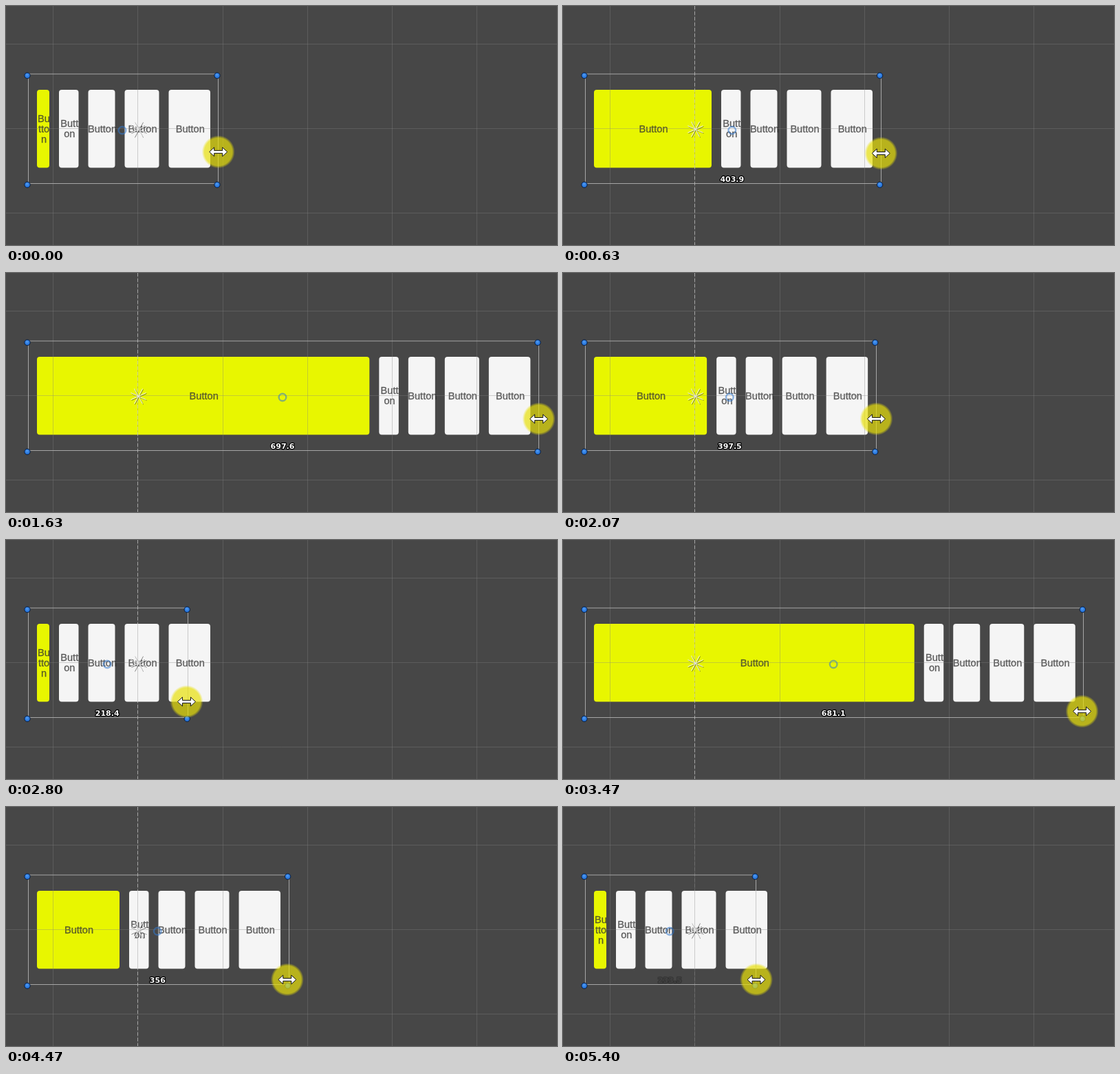
Write an HTML page with a canvas that moves like this. It is 801x348 px and loops after 5.46 s.

```html
<!DOCTYPE html>
<html lang="en">
<head>
<meta charset="utf-8">
<title>Layout resize</title>
<style>
  html, body { margin: 0; width: 100%; height: 100%; overflow: hidden; background: #474747; }
  canvas { display: block; }
</style>
</head>
<body>
<canvas id="stage" width="801" height="348"></canvas>
<script>
const ctx = document.getElementById('stage').getContext('2d');
const LOOP = 5460, WIDTH = 801, HEIGHT = 348, GAP = 14;
const START_SIZE = 259.5;

// Each drag eases the panel to a new size; a higher snap brakes earlier.
const DRAGS = [
  { from: 300, to: 1400, size: 698.7, snap: 2.8506 },
  { from: 1610, to: 2530, size: 218.4, snap: 2.6361 },
  { from: 2800, to: 3730, size: 711, snap: 3.1232 },
  { from: 3910, to: 4970, size: 233.5, snap: 3.1018 }
];

const ramp = (t, from, to) => Math.max(0, Math.min(1, (t - from) / (to - from)));
const ease = (u, snap) => 1 - (1 - u) ** snap * (1 + snap * u);

function panelSize(t) {
  let size = START_SIZE;
  for (const d of DRAGS) size += (d.size - size) * ease(ramp(t, d.from, d.to), d.snap);
  return size;
}

const pointerLag = t => -0.3 - 2.5 * (ramp(t, 2170, 2530) - ramp(t, 4470, 4970));

const pointerY = t => 212.4 + 3 * Math.sin(Math.PI * ramp(t, 300, 1640)) +
  23 * ramp(t, 2070, 2530) + 14 * ramp(t, 2800, 3470) + 2 * ramp(t, 3470, 4470);

function line(x1, y1, x2, y2) {
  ctx.beginPath();
  ctx.moveTo(x1, y1);
  ctx.lineTo(x2, y2);
  ctx.stroke();
}

function circle(x, y, r) {
  ctx.beginPath();
  ctx.arc(x, y, r, 0, Math.PI * 2);
}

function wrap(text, width) {
  const lines = [''];
  for (const ch of text) {
    const last = lines.length - 1;
    if (lines[last] && ctx.measureText(lines[last] + ch).width * 0.88 > width) lines.push(ch);
    else lines[last] += ch;
  }
  return lines;
}

function button(x, width, color) {
  ctx.fillStyle = color;
  ctx.beginPath();
  ctx.roundRect(x, 122, width, 113.5, 4);
  ctx.fill();
  ctx.fillStyle = ctx.strokeStyle = 'rgba(50,50,50,.75)';
  ctx.lineWidth = 0.3;
  ctx.font = '14.6px "Liberation Sans", Arial, sans-serif';
  const lines = wrap('Button', width);
  lines.forEach((text, i) => {
    const y = 184 + Math.floor((i - (lines.length - 1) / 2) * 15);
    ctx.fillText(text, x + width / 2 + 1, y);
    ctx.strokeText(text, x + width / 2 + 1, y);
  });
  ctx.lineWidth = 1;
}

function grid() {
  ctx.strokeStyle = 'rgba(130,130,130,.36)';
  for (let i = 0; i < 6; i++) {
    const x = Math.floor(68.7 + i * 123.25) + 0.5;
    line(x, 0, x, HEIGHT);
  }
  for (let i = 0; i < 3; i++) {
    const y = Math.floor(55 + i * 123.4) + 0.5;
    line(0, y, WIDTH, y);
  }
}

function anchors() {
  for (const [shift, color] of [[1, 'rgba(40,40,40,.55)'], [0, '#f4f4f4']]) {
    const c = 192.5 + shift, m = 179.5 + shift;
    ctx.strokeStyle = color;
    for (const sx of [-1, 1]) for (const sy of [-1, 1]) {
      line(c, m, c + sx * 11, m + sy * 5);
      line(c, m, c + sx * 6, m + sy * 11);
    }
  }
}

function handle(x, y) {
  const shade = ctx.createRadialGradient(x - 0.5, y - 1.5, 0, x, y, 4.5);
  shade.addColorStop(0, '#55a0f5');
  shade.addColorStop(1, '#1765d0');
  circle(x, y, 4.2);
  ctx.fillStyle = shade;
  ctx.fill();
  ctx.strokeStyle = '#0c1f3c';
  ctx.stroke();
}

function pointer(x, y) {
  const halo = ctx.createRadialGradient(x, y, 0, x, y, 24);
  halo.addColorStop(0, 'rgba(232,224,10,.7)');
  halo.addColorStop(0.84, 'rgba(232,224,10,.7)');
  halo.addColorStop(1, 'rgba(232,224,10,0)');
  circle(x, y, 24);
  ctx.fillStyle = halo;
  ctx.fill();

  // One half of the double arrow, mirrored through its centre.
  const half = [[-13, 0], [-6, -6.5], [-6, -2], [6, -2], [6, -6.5]];
  ctx.beginPath();
  for (const s of [1, -1])
    for (const [px, py] of half) ctx.lineTo(x + s * px, y + s * py);
  ctx.closePath();
  ctx.fillStyle = '#fff';
  ctx.fill();
  ctx.strokeStyle = '#111';
  ctx.stroke();
}

function sizeLabel(size, x, alpha) {
  const text = String(Math.round(size * 10) / 10);
  ctx.font = 'bold 11px "DejaVu Sans", Verdana, sans-serif';
  ctx.lineWidth = 2.5;
  ctx.strokeStyle = `rgba(0,0,0,${alpha})`;
  ctx.strokeText(text, x, 256);
  ctx.fillStyle = `rgba(255,255,255,${alpha * alpha})`;
  ctx.fillText(text, x, 256);
  ctx.lineWidth = 1;
}

function draw(t) {
  const size = panelSize(t);
  const right = 33 + size * 1.0635;
  const middle = (29 + right) / 2;
  const alpha = ramp(t, 320, 410) * (1 - ramp(t, 5200, LOOP));

  ctx.fillStyle = '#474747';
  ctx.fillRect(0, 0, WIDTH, HEIGHT);
  ctx.lineWidth = 1;
  ctx.lineJoin = 'round';
  ctx.textAlign = 'center';

  // The first button takes the spare room, the others keep their widths.
  let x = Math.max(63, right - 246.6);
  button(45, x - 45, '#e8f600');
  for (const width of [28.5, 39, 50, 60.5]) {
    button(x + GAP, width, '#f5f5f5');
    x += GAP + width;
  }
  grid();

  ctx.strokeStyle = `rgba(205,205,205,${0.65 * alpha})`;
  ctx.setLineDash([5, 3]);
  line(191.5, 0, 191.5, HEIGHT);
  ctx.setLineDash([]);

  ctx.strokeStyle = 'rgba(190,190,190,.8)';
  ctx.strokeRect(32.5, 99, Math.round(right) - 33, 159.5);
  anchors();

  ctx.strokeStyle = 'rgba(50,120,205,.55)';
  ctx.lineWidth = 2.4;
  circle(middle, 181, 5.3);
  ctx.stroke();
  ctx.lineWidth = 1;

  for (const hx of [31, right - 2]) for (const hy of [101, 260]) handle(hx, hy + 0.3);
  sizeLabel(size, middle, alpha);
  pointer(right + pointerLag(t), pointerY(t));
}

const start = performance.now();
function tick() {
  // Centisecond steps, like the recording's clock.
  draw(Math.floor((performance.now() - start) / 10) * 10 % LOOP);
  requestAnimationFrame(tick);
}
tick();
</script>
</body>
</html>
```
